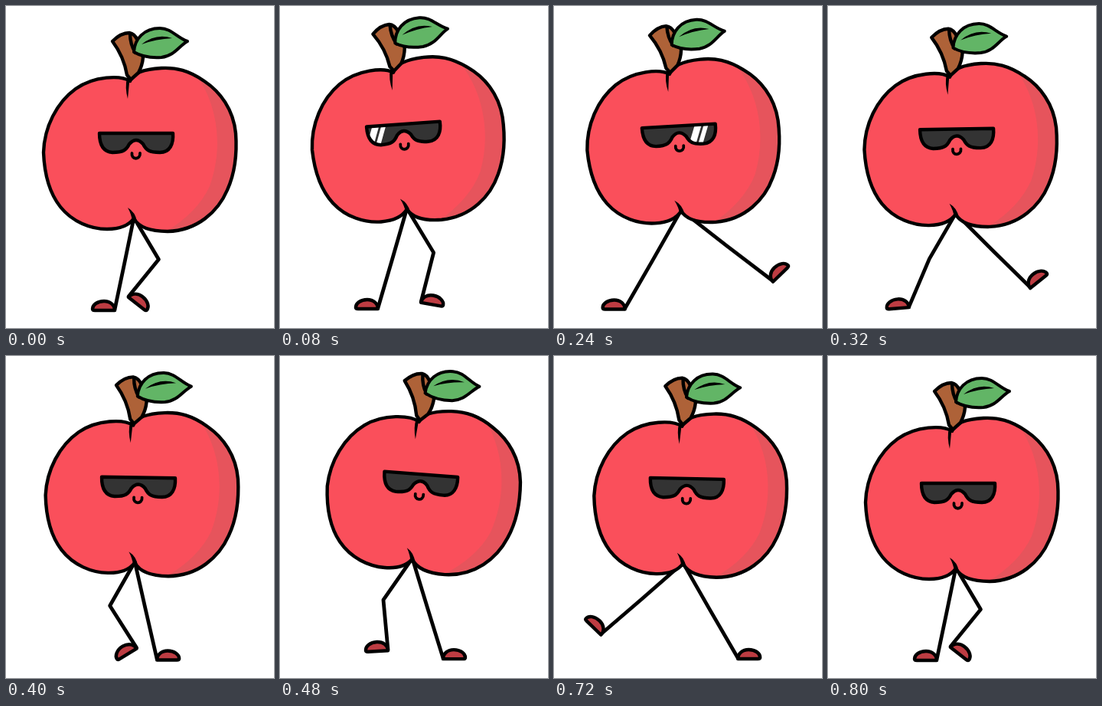
An HTML page that plays this animation: 350 by 420 pixels, repeating every 840 ms.

```html
<!DOCTYPE html>
<html lang="en">
<head>
<meta charset="utf-8">
<title>Strutting apple</title>
<style>
  html, body { margin: 0; width: 100%; height: 100%; overflow: hidden; background: #fff; }
  svg { display: block; width: 350px; height: 420px; }
  .line { fill: none; stroke: #000; stroke-width: 4.4; stroke-linecap: round; stroke-linejoin: round; }
  .leg { stroke-width: 4.8; }
  .foot { fill: #bd3c42; }
</style>
</head>
<body>
<svg viewBox="0 0 350 420">
  <defs>
    <path id="skin" d="M162 98C150 90 115 91 91 108C66 126 50 158 49 191C50 217 56 243 71 262C87 282 111 291 132 291C148 291 160 287 167 277C174 290 190 294 211 294C250 293 277 268 289 240C299 218 302 194 300 166C297 135 280 112 259 98C239 84 222 80 203 81C184 82 166 86 162 98Z"/>
    <path id="shades" d="M122 166H218C219 180 214 191 201 191C187 191 183 188 179 180Q170 170 161 180C157 188 153 191 139 191C126 190 122 180 122 166Z"/>
    <path id="foot" d="M0 0C0 -7 6 -12 14 -12C23 -12 29 -7 29 -2Q29 0 26 0Z"/>
    <clipPath id="inSkin"><use href="#skin"/></clipPath>
    <clipPath id="inShades"><use href="#shades"/></clipPath>
  </defs>

  <path id="legA" class="line leg"/>
  <path id="legB" class="line leg"/>
  <use id="footA" href="#foot" class="line foot" style="fill:#bd3c42"/>
  <use id="footB" href="#foot" class="line foot" style="fill:#bd3c42"/>

  <g id="apple">
    <use href="#skin" fill="#fa4f5b"/>
    <path clip-path="url(#inSkin)" fill="#e6545c" d="M245 85C276 125 285 182 266 235Q250 270 206 296H310V85Z"/>
    <use href="#skin" class="line"/>
    <path d="M164 91L161 100L159 121Q155 106 158 94Z"/>
    <path d="M159 263Q169 269 171 281L165 281Q164 272 159 263Z"/>

    <path class="line" style="fill:#ae6238" d="M139 46Q150 35 161 35Q168 36 172 45L179 67Q178 78 173 87L163 96L158 90Q154 66 139 46Z"/>
    <path class="line" d="M162 36Q162 50 169 61"/>
    <path class="line" style="fill:#62b566;stroke-width:4" d="M167 60C168 43 180 29 201 29C216 29 223 41 237 46C226 52 220 65 203 67C188 68 177 66 167 60Z"/>
    <path d="M177 50Q196 35 217 42Q196 43 177 50Z"/>

    <use href="#shades" fill="#333"/>
    <g clip-path="url(#inShades)">
      <path id="gleam" fill="#fff" d="M-3 165H6L-4 193H-13ZM9 165H15L5 193H-1Z"/>
    </g>
    <use href="#shades" class="line"/>
    <path class="line" style="stroke-width:3.8" d="M164.500 192C163 201 176 201 175 192"/>
  </g>
</svg>
<script>
const LOOP = 840, TICK = 40, SWAP = 380, STEP = 420, AXIS = 168;
const $ = id => document.getElementById(id);

// One leg over two steps: phase, then ankle outward, ankle y, foot turn, knee bend
const gait = [
  [0, -8, 380, 38, 36],        // crossed behind
  [.21, 16, 387, 10, 26],      // knee out
  [.43, 102, 365, -42, 0],     // kick
  [.6, 120, 359, -44, 0],
  [.82, 106, 364, -44, 0],
  [1, 26, 397, 0, 0],          // plant
  [1.21, 40, 395, 0, 0],
  [1.43, 79, 396, 0, 0],       // push out
  [1.82, 72, 395, 0, 0],
  [2, -8, 380, 38, 36]
];

function pose(phase) {
  const i = gait.findIndex(k => k[0] > phase), a = gait[i - 1], b = gait[i];
  const u = (phase - a[0]) / (b[0] - a[0]);
  return a.slice(1).map((v, j) => v + (b[j + 1] - v) * u);
}

// Rise and fall over one step, peaking early when skew < 1
const arc = (p, skew, sharp) => Math.max(0, Math.sin(Math.PI * p ** skew)) ** sharp;

function drawLeg(name, side, hipX, hipY, phase) {
  const [out, y, turn, bend] = pose(phase % 2);
  const x = AXIS + side * out, dx = x - hipX, dy = y - hipY, d = Math.hypot(dx, dy);
  const kneeX = hipX + dx / 2 + side * bend * dy / d;
  const kneeY = hipY + dy / 2 - side * bend * dx / d;
  $("leg" + name).setAttribute("d", `M${hipX} ${hipY}L${kneeX} ${kneeY}L${x} ${y - 1}`);
  $("foot" + name).setAttribute("transform",
    `translate(${x} ${y}) scale(${side} 1) rotate(${turn})`);
}

function draw(now) {
  const t = Math.floor(now % LOOP / TICK) * TICK;
  const first = t < SWAP;
  const p = first ? t / SWAP : Math.min(1, (t - SWAP) / STEP);
  const phase = first ? p : 1 + p;

  const tilt = (first ? -5.2 : 5.2) * arc(p, .7, 1.7);
  const x = 167 + tilt * (first ? .3 : 1.3);
  const y = 276 - 12.5 * arc(p, .6, .7);

  $("apple").setAttribute("transform", `translate(${x} ${y}) rotate(${tilt}) translate(-167 -276)`);
  drawLeg("A", -1, x, y, phase + 1);
  drawLeg("B", 1, x, y, phase);
  $("gleam").setAttribute("transform", `translate(${102 + t * .385} 0)`);
}

function tick() {
  draw(performance.now());
  requestAnimationFrame(tick);
}
tick();
</script>
</body>
</html>
```
